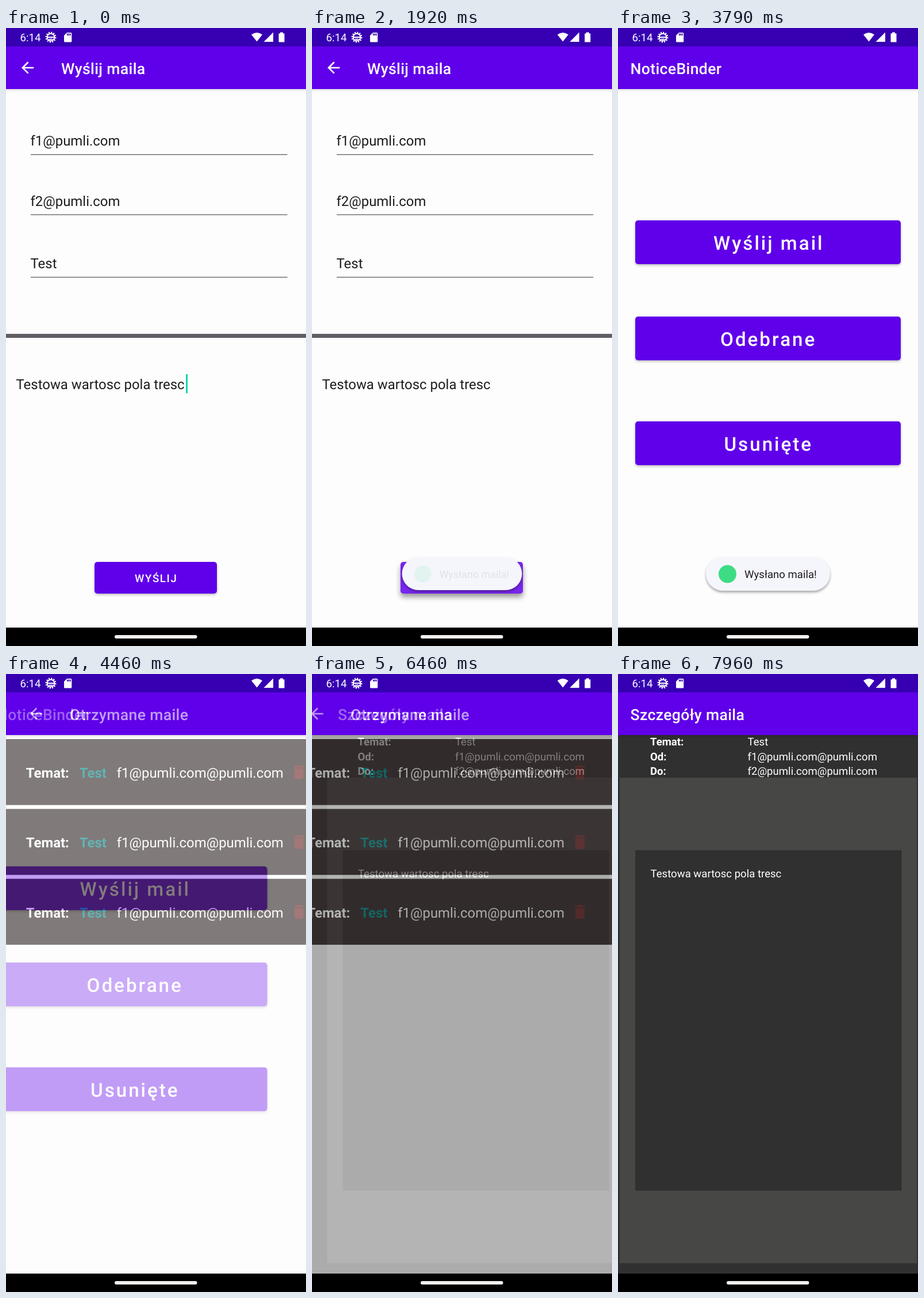
An HTML page for the animation above (8000 ms loop, 522 by 1073 pixels).

```html
<!DOCTYPE html>
<html lang="pl">
<head>
<meta charset="utf-8">
<title>Poczta</title>
<style>
  html, body { margin: 0; width: 100%; height: 100%; overflow: hidden; background: #000; }
  svg { display: block; }
  text { font-family: Roboto, sans-serif; white-space: pre; text-rendering: geometricPrecision; }
  .button { filter: drop-shadow(0 2px 2px #0004); }
  #send.pressed { filter: drop-shadow(0 6px 5px #0006); }
  .bar { filter: drop-shadow(0 2px 2px #0002); }
  #toast { transform-origin: 261px 948px; }
  #pill { filter: drop-shadow(0 3px 2px #0005); }
</style>
</head>
<body>
<svg id="stage" width="522" height="1073" viewBox="0 0 522 1073"></svg>
<script>
const LOOP = 8000;
const PURPLE = '#6000ea', INK = '#1d1c1f', PAPER = '#fdfdfd';
const SMALL = 18.6, BODY = 23.93, TITLE = 26.6, LARGE = 33.2;
const FROM = 'f1@pumli.com', TO = 'f2@pumli.com', HOST = '@pumli.com';
const MESSAGE = 'Testowa wartosc pola tresc';

const rect = (x, y, w, h, fill, extra = '') =>
  `<rect x="${x}" y="${y}" width="${w}" height="${h}" fill="${fill}" ${extra}/>`;
const text = (x, y, size, str, fill = '#fff', weight = 400, extra = '') =>
  `<text x="${x}" y="${y}" font-size="${size}" fill="${fill}" font-weight="${weight}" ${extra}>${str}</text>`;
const icon = (x, y, scale, d, fill = '#fff') =>
  `<path transform="translate(${x} ${y}) scale(${scale})" fill="${fill}" d="${d}"/>`;

// Screens are wider than the stage so that their edges stay filled while sliding.
const screen = (id, title, hasBack, background, content) => `<g id="${id}">
  ${rect(-60, 0, 642, 1073, background)}
  ${content}
  ${rect(-60, 0, 642, 106, PURPLE, 'class="bar"')}
  ${hasBack ? icon(21.7, 53, 1.33, 'M20 11H7.83l5.59-5.59L12 4l-8 8 8 8 1.41-1.41L7.83 13H20v-2z') : ''}
  ${text(hasBack ? 96 : 21.5, 80, TITLE, title, '#fff', 500, 'letter-spacing=".0125em"')}</g>`;

const button = (id, x, y, w, h, textX, baseline, size, label) => `<g id="${id}" class="button">
  ${rect(x, y, w, h, PURPLE, 'rx="5"')}
  ${rect(x, y, w, h, '#fff', 'rx="5" class="ripple" opacity="0"')}
  ${text(textX, baseline, size, label, '#fff', 500, 'letter-spacing=".0893em"')}</g>`;

const field = (y, str) => text(42.5, y, BODY, str, INK) + rect(43, y + 15, 446.5, 1.4, '#6c6a6f');

const mailRow = i => {
  const y = 113 + i * 121.3;
  return rect(-60, y, 642, 114.5, '#332a29')
    + text(20, y + 67, BODY, 'Temat:', '#fff', 700)
    + text(113, y + 67, BODY, 'Test', '#018786', 700)
    + text(178, y + 67, BODY, FROM + HOST)
    + icon(479, y + 41.5, 1.33,
        'M6 19c0 1.1.9 2 2 2h8c1.1 0 2-.9 2-2V7H6v12zM19 4h-3.5l-1-1h-5l-1 1H5v2h14V4z', '#6b2727');
};

const detail = (y, label, value) =>
  text(56, y, SMALL, label, '#fff', 700) + text(225.5, y, SMALL, value);

const compose = screen('compose', 'Wyślij maila', true, PAPER,
  field(204, FROM) + field(308.5, TO) + field(417, 'Test')
  + rect(-60, 531, 642, 7, '#615f63')
  + text(17.5, 627, BODY, MESSAGE, INK)
  + rect(313, 601, 3, 33, '#12d6ae', 'id="cursor"')
  + button('send', 154, 927, 213, 55, 224, 962, SMALL, 'WYŚLIJ'));

const menu = screen('menu', 'NoticeBinder', false, PAPER,
  button('write', 30, 334, 462, 76, 166, 385, LARGE, 'Wyślij mail')
  + button('received', 30, 501, 462, 76, 178, 552, LARGE, 'Odebrane')
  + button('deleted', 30, 683, 462, 76, 184.5, 734, LARGE, 'Usunięte'));

const inbox = screen('inbox', 'Otrzymane maile', true, PAPER, [0, 1, 2].map(mailRow).join(''));

const details = screen('details', 'Szczegóły maila', false, '#2f302f',
  detail(124, 'Temat:', 'Test') + detail(149.5, 'Od:', FROM + HOST) + detail(175, 'Do:', TO + HOST)
  + rect(3, 180, 517, 843, '#474746')
  + rect(30, 306, 463.5, 591, '#2f302f')
  + text(56.5, 353, SMALL, MESSAGE));

const toast = `<g id="toast">
  ${rect(153, 918, 216, 59, '#f5f6fc', 'rx="29.5" id="pill"')}
  <g id="toastContent"><circle cx="190.5" cy="948" r="15.5" fill="#3ddc84"/>
  ${text(220, 955, SMALL, 'Wysłano maila!', INK)}</g></g>`;

const systemBars = rect(0, 0, 522, 32, '#3600b2')
  + text(24.5, 23, SMALL, '6:14')
  + `<g fill="none" stroke="#fff"><circle cx="78" cy="16" r="6.3" stroke-width="2"/>
     <circle cx="78" cy="16" r="8.3" stroke-width="2.4" stroke-dasharray="2.17"/>
     <path d="M72 16h12M75 19.5h6" stroke-width="2"/></g>`
  + icon(97.7, 6.3, .83, 'M18 2h-8L4 8v12c0 1.1.9 2 2 2h12c1.1 0 2-.9 2-2V4c0-1.1-.9-2-2-2zm-6 6h-2V4h2v4zm3 0h-2V4h2v4zm3 0h-2V4h2v4z')
  + icon(0, 0, 1, 'M427 11.5Q436.500 4.500 446 11.500L436.500 23.500ZM465 7.500V24H448.500ZM477 7.500h5v2h2.500V24.500h-10V9.500H477Z')
  + rect(0, 1041, 522, 32, '#000')
  + rect(189, 1054, 143.5, 6, '#f3f0ee', 'rx="3"');

const byId = id => document.getElementById(id);
byId('stage').innerHTML = compose + menu + inbox + details + toast + systemBars;

const clamp = v => Math.min(1, Math.max(0, v));
const ramp = (t, start, duration) => clamp((t - start) / duration);

// Eased value at x on a cubic segment given by its four x and four y values.
function bezier(x, xs, ys) {
  const at = ([a, b, c, d], s) =>
    a * (1 - s) ** 3 + 3 * b * s * (1 - s) ** 2 + 3 * c * s * s * (1 - s) + d * s ** 3;
  let low = 0, high = 1;
  for (let i = 0; i < 24; i++) {
    const mid = (low + high) / 2;
    if (at(xs, mid) < x) low = mid; else high = mid;
  }
  return at(ys, (low + high) / 2);
}

const slideEase = x => x < 1 / 6
  ? bezier(x, [0, .05, .1333, .1667], [0, 0, .06, .4])
  : bezier(x, [.1667, .2083, .25, 1], [.4, .82, 1, 1]);

const SLIDE = 52.2;
const transitions = [
  { from: 'compose', to: 'menu', start: 2050 },
  { from: 'menu', to: 'inbox', start: 4360 },
  { from: 'inbox', to: 'details', start: 6378 }
];

function drawTransition({ from, to, start }, t) {
  const p = slideEase(ramp(t, start, 450));
  const shift = t < start + 450 ? p * SLIDE : SLIDE;
  if (t >= start) byId(from).setAttribute('transform', `translate(${-shift} 0)`);
  else if (from === 'compose') byId(from).removeAttribute('transform');
  if (t < start + 450 || to === 'details') {
    byId(to).setAttribute('transform', `translate(${SLIDE - shift} 0)`);
  } else {
    byId(to).removeAttribute('transform');
  }
  byId(to).setAttribute('opacity', ramp(t, start + 50, 83));
}

function drawToast(t) {
  const show = 1845, hide = 4000;
  const enter = bezier(ramp(t, show, 333), [0, 0, 0, 1], [0, 0, 1, 1]);
  const leave = bezier(ramp(t, hide, 250), [0, .3, 1, 1], [0, 0, 1, 1]);
  byId('toast').style.transform = `scale(${.9 + .1 * (enter - leave)})`;
  byId('toast').setAttribute('opacity', ramp(t, show, 66) * (1 - ramp(t, hide + 150, 100)));
  byId('toastContent').setAttribute('opacity', ramp(t, show + 50, 283) * (1 - ramp(t, hide, 166)));
}

function drawPress(id, t, start) {
  byId(id).querySelector('.ripple').setAttribute('opacity', .15 * ramp(t, start, 80));
}

function draw(t) {
  byId('cursor').setAttribute('opacity', t < 1700 && t % 1000 < 500 ? 1 : 0);
  drawPress('send', t, 1720);
  byId('send').classList.toggle('pressed', t >= 1760);
  drawPress('received', t, 4200);
  transitions.forEach(step => drawTransition(step, t));
  drawToast(t);
}

function tick() {
  draw(performance.now() % LOOP);
  requestAnimationFrame(tick);
}
tick();
</script>
</body>
</html>
```
